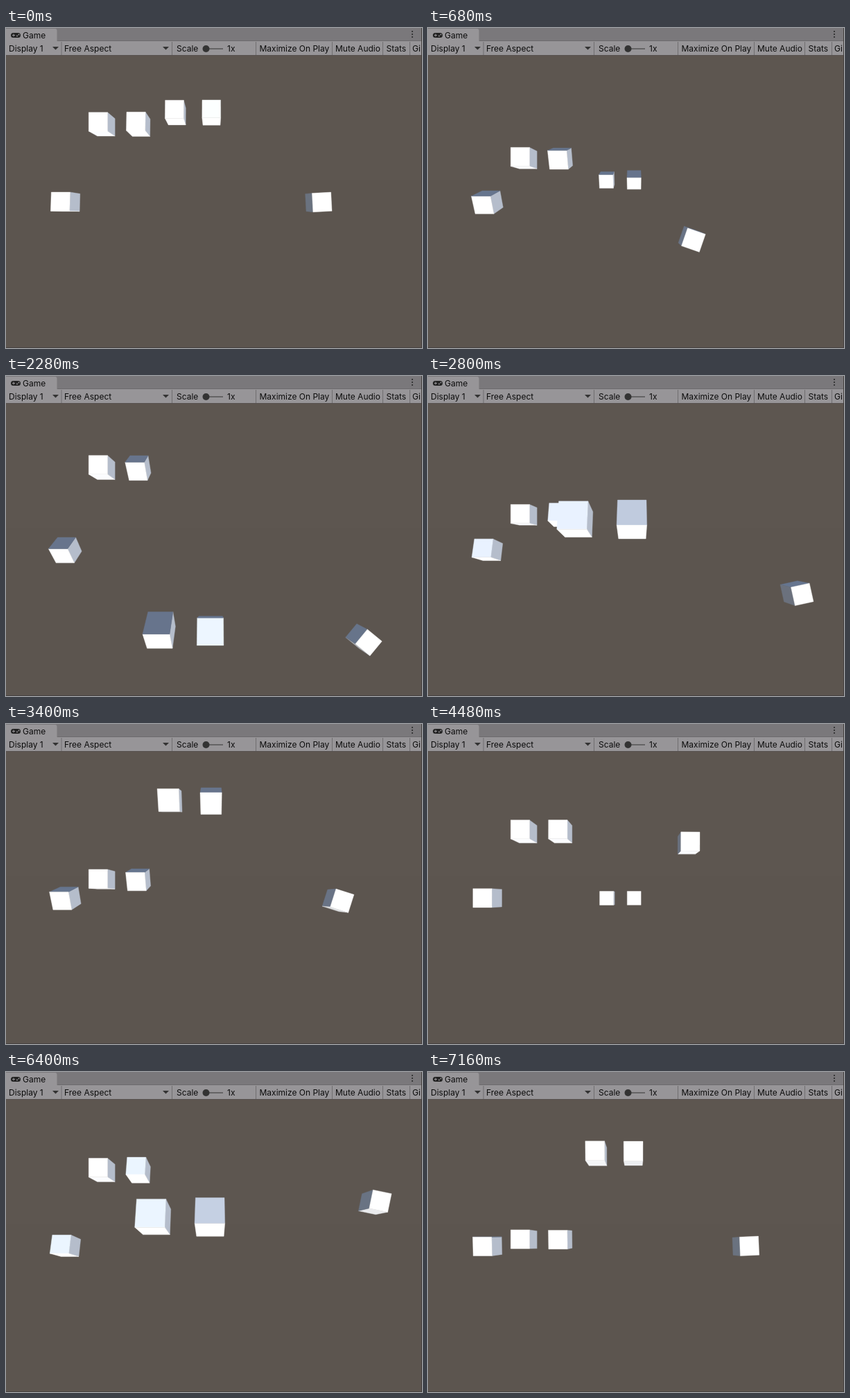
An HTML page with a canvas that plays this animation: 600x462 px, repeating every 7200 ms.

```html
<!DOCTYPE html>
<html lang="en">
<head>
<meta charset="utf-8">
<title>Game view</title>
<style>
  html, body { margin: 0; width: 600px; height: 462px; overflow: hidden; background: #5c554f; }
  canvas, svg { position: absolute; left: 0; top: 0; display: block; }
  text { font: 12px Inter, Roboto, sans-serif; fill: #0c0c0c; }
</style>
</head>
<body>
<canvas id="view" width="600" height="462"></canvas>
<svg width="600" height="462">
  <rect width="600" height="19" fill="#7a787b"/>
  <rect y="19" width="600" height="20" fill="#979598"/>
  <path d="M0 20V1H71Q73.500 1 73.500 4V20Z" fill="#979598"/>
  <path d="M74 18.500H600" stroke="#6d6b6d"/>
  <path d="M0 39.500H600" stroke="#575150"/>
  <path d="M80 20V39M239.500 20V39M360.500 20V39M470.500 20V39M543.500 20V39M582.500 20V39" stroke="#706e70"/>
  <path d="M0 461.500H600M599.500 0V462" stroke="#454140"/>
  <rect x="7" y="7" width="14" height="7" rx="3.500" fill="#222"/>
  <path d="M9 10.500H13M11 8.500V12.500" stroke="#979598"/>
  <g fill="#979598"><circle cx="16" cy="11.500" r="1"/><circle cx="18.500" cy="9.500" r="1"/></g>
  <g fill="#222"><circle cx="586" cy="5" r="1"/><circle cx="586" cy="9" r="1"/><circle cx="586" cy="13" r="1"/></g>
  <path d="M67 27H76L71.500 31.500ZM226 27H235L230.500 31.500Z" fill="#333"/>
  <path d="M288 30H313" stroke="#555" stroke-width="1.500"/>
  <circle cx="288.500" cy="30" r="5" fill="#333"/>
  <text x="24" y="14.500">Game</text>
  <text x="4" y="33.500">Display 1</text>
  <text x="84" y="33.500">Free Aspect</text>
  <text x="246" y="33.500">Scale</text>
  <text x="319" y="33.500">1x</text>
  <text x="365.500" y="33.500">Maximize On Play</text>
  <text x="475" y="33.500">Mute Audio</text>
  <text x="548.500" y="33.500">Stats</text>
  <text x="586" y="33.500">Gi</text>
</svg>
<script>
const g = document.getElementById('view').getContext('2d');
const LOOP = 7200, STEP = 40;
const FOCAL = 365.5, DEPTH = 13.93, CX = 300, CY = 251.3;
const LIGHT = [75, -141, -162];
const AMBIENT = [106, 114, 128], SKY = [-4, 3, 15];
const rad = d => d * Math.PI / 180;
const dot = (a, b) => a[0] * b[0] + a[1] * b[1] + a[2] * b[2];

const rotX = deg => {
  const c = Math.cos(rad(deg)), s = Math.sin(rad(deg));
  return ([x, y, z]) => [x, y * c - z * s, y * s + z * c];
};
const rotZ = deg => {
  const c = Math.cos(rad(deg)), s = Math.sin(rad(deg));
  return ([x, y, z]) => [x * c - y * s, x * s + y * c, z];
};

function shade(n) {
  const lit = Math.max(0, dot(n, LIGHT));
  const rgb = AMBIENT.map((a, i) => Math.min(255, Math.round(a + SKY[i] * n[1] + lit)));
  return `rgb(${rgb})`;
}

function cube(pos, turn) {
  const place = v => turn(v).map((c, i) => c + pos[i] + (i === 2 ? DEPTH : 0));
  for (let axis = 0; axis < 3; axis++) {
    for (const side of [-1, 1]) {
      const corner = (u, w) => {
        const v = [0, 0, 0];
        v[axis] = side / 2;
        v[(axis + 1) % 3] = u / 2;
        v[(axis + 2) % 3] = w / 2;
        return place(v);
      };
      const dir = [0, 0, 0];
      dir[axis] = side;
      const normal = turn(dir);
      if (dot(normal, corner(0, 0)) >= 0) continue; // facing away
      g.beginPath();
      for (const [u, w] of [[-1, -1], [1, -1], [1, 1], [-1, 1]]) {
        const [x, y, z] = corner(u, w);
        g.lineTo(CX + FOCAL * x / z, CY - FOCAL * y / z);
      }
      g.closePath();
      g.fillStyle = g.strokeStyle = shade(normal);
      g.fill();
      g.stroke();
    }
  }
}

function bounce(t) {
  const span = 5.06, p = (4.29 + 5 * t) % (2 * span);
  return Math.min(p, 2 * span - p) - 0.03;
}

function draw(t) {
  g.fillStyle = '#5d5650';
  g.fillRect(0, 0, 600, 219);
  g.fillStyle = '#5c554f';
  g.fillRect(0, 219, 600, 243);
  g.lineWidth = 0.4;

  const a = 3 + 99.8 * t, spin = rotX(a), still = v => v, y = bounce(t);
  cube([-8.14, 0, 0], spin);
  cube([-6.14, y, 0], still);
  cube([-4.14, y, 0], spin);
  const [, oy, oz] = spin([0, 5, 0]);
  cube([-2.14, oy, oz], spin);
  cube([-0.14, oy, oz], rotX(2 * a));

  // figure of eight: lower ring counterclockwise, upper ring clockwise
  const up = a % 720 < 360 ? -1 : 1;
  const roll = rotZ(-up * a), [rx, ry] = roll([0, -3 * up, 0]);
  cube([5.88 + rx, 3 * up + ry, 0], roll);
}

function tick(now) {
  draw(Math.floor(now % LOOP / STEP) * STEP / 1000);
  requestAnimationFrame(tick);
}
requestAnimationFrame(tick);
</script>
</body>
</html>
```
